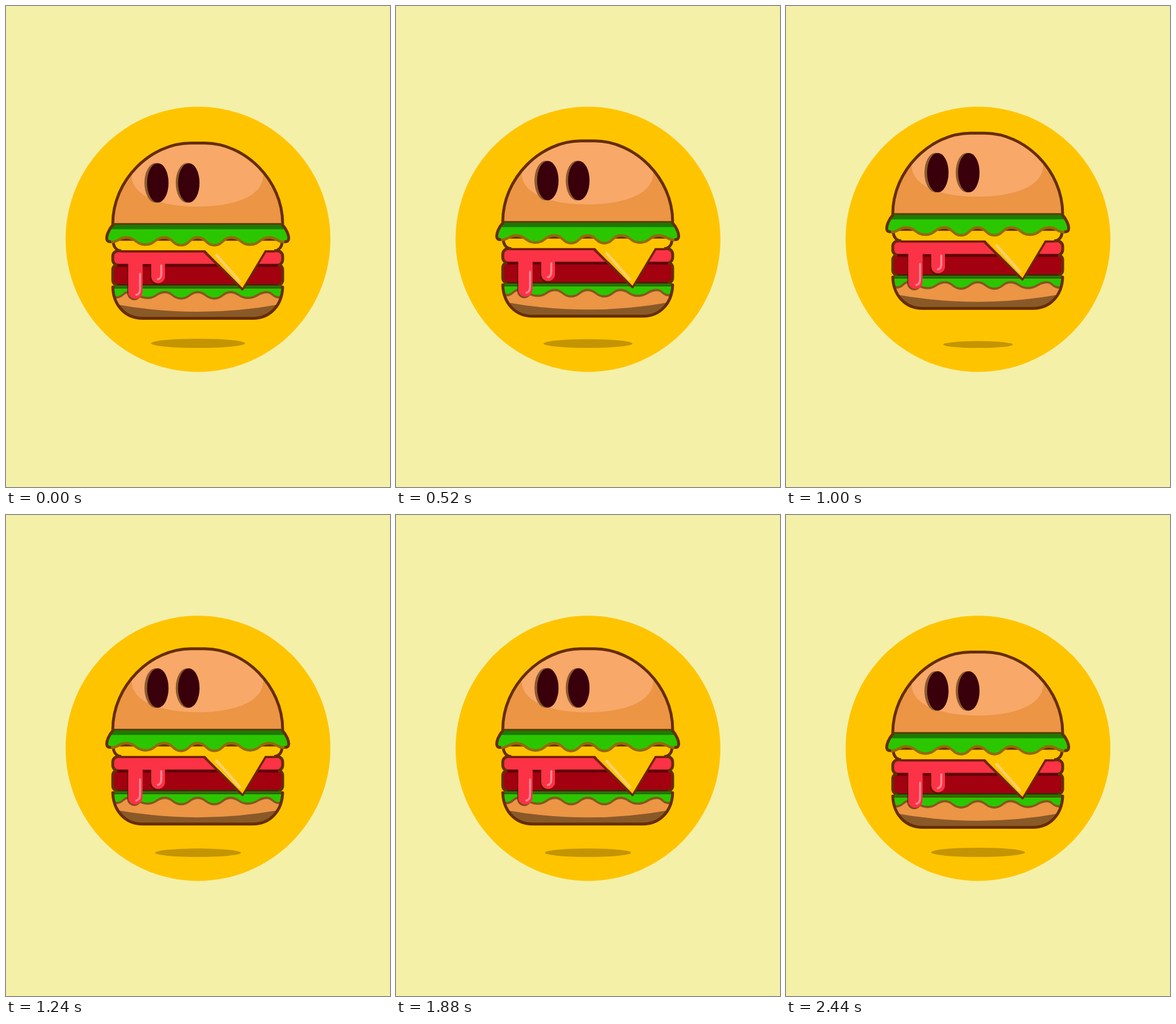
An HTML page for the animation above (2480 ms loop, 669 px wide and 837 px high).

```html
<!DOCTYPE html>
<html lang="en">
<head>
<meta charset="utf-8">
<title>Floating burger</title>
<style>
  html, body { margin: 0; width: 100%; height: 100%; overflow: hidden; background: #f4f0a8; }
  svg { display: block; width: 669px; height: 837px; }
  .rim { stroke: #662d00; stroke-width: 5; stroke-linejoin: round; stroke-linecap: round; }
  .line { fill: none; stroke-linecap: butt; }
  .shine { fill: none; stroke-linecap: round; }
</style>
</head>
<body>
<svg viewBox="0 0 669 837">
  <defs>
    <path id="dome" d="M186 379C186 303 252 238.5 322 238.5H346C416 238.5 482 303 482 379"/>
    <path id="heel" d="M186 489C187 521 208 543.5 238 543.5H430C460 543.5 481 521 482 489Z"/>
    <path id="drips" d="M213 436H277V470.5A12 12 0 0 1 253 470.5V449H238V497A12.5 12.5 0 0 1 213 497Z"/>
    <clipPath id="domeClip"><use href="#dome"/></clipPath>
    <clipPath id="heelClip"><use href="#heel"/></clipPath>
    <clipPath id="dripClip"><rect x="205" y="451" width="80" height="70"/></clipPath>
  </defs>

  <circle cx="334.5" cy="406" r="230.7" fill="#ffc400"/>
  <ellipse id="shadow" cx="334.5" fill="#c49500"/>

  <g id="burger">
    <!-- bottom bun and lower lettuce -->
    <use href="#heel" fill="#eb9545"/>
    <g clip-path="url(#heelClip)">
      <path d="M180 517Q334 547 488 517V550H180Z" fill="#8a5928"/>
      <path id="lowEdge" class="line" stroke="#85581c" stroke-width="5"/>
      <path id="lowLeaf" fill="#2ac700"/>
    </g>
    <use href="#heel" class="rim" fill="none"/>

    <!-- patty and tomato -->
    <rect class="rim" x="186" y="450" width="296" height="36" rx="9" fill="#a30010"/>
    <rect class="rim" x="186" y="426" width="296" height="25" rx="9.5" fill="#fc3246"/>
    <path d="M194 451.5H474" stroke="#62000c" stroke-width="4.5"/>
    <path d="M194 485.5H474" stroke="#501400" stroke-width="2.5"/>
    <path d="M189 488.3H479" stroke="#1d7a00" stroke-width="4"/>

    <!-- sauce drips -->
    <use href="#drips" x="-2" y="2.5" fill="#4a1600" fill-opacity=".62" clip-path="url(#dripClip)"/>
    <use href="#drips" fill="#fc3246"/>
    <g class="shine" stroke="#ff8592" stroke-width="3.5">
      <path d="M233.5 466V494Q233 501.5 227 502.5"/>
      <path d="M270.5 451.5V467Q270 474.5 264.5 475.5"/>
    </g>

    <!-- cheese -->
    <path class="rim" d="M187 406C186 420 193 426 202 426H466C475 426 482 420 481 406Z" fill="#ffc400"/>
    <path d="M201 423.5H467" stroke="#ffc400" stroke-width="3.5"/>
    <path d="M201 427H467" stroke="#761c08" stroke-width="3.5"/>
    <path d="M345 427L412 493L452 427" fill="none" stroke="#6e2500" stroke-width="4" stroke-linejoin="round"/>
    <path d="M343 421L412 490.5L453.500 421Z" fill="#ffc400"/>
    <path class="shine" d="M367 434L407 479" stroke="#fdd06a" stroke-width="5"/>

    <!-- upper lettuce -->
    <path id="topLeaf" fill="#2ac700"/>
    <path id="topEdge" class="line" stroke="#946a04" stroke-width="4.5"/>
    <path d="M187 379H481L487 388.5H181Z" fill="#1d7a00"/>
    <path class="line rim" d="M187 380C178.500 389 175 400 175.500 405Q176 411 183 410M481 380C489.500 389 493 400 492.500 405Q492 411 485 410"/>

    <!-- top bun -->
    <use href="#dome" fill="#eb9545"/>
    <path clip-path="url(#domeClip)" d="M219 295C219 331 270 349 333.500 349S448 331 448 295V230H219Z" fill="#f8a868"/>
    <use href="#dome" class="rim" fill="none"/>
    <path d="M186 379.300H482" stroke="#5b3a00" stroke-width="3"/>

    <g id="eyes">
      <g fill="#8a5a2e">
        <ellipse cx="260.700" rx="19.500" ry="34.500"/>
        <ellipse cx="315.200" rx="19.500" ry="34.500"/>
      </g>
      <g fill="#39000b">
        <ellipse cx="264.500" rx="18.700" ry="34.300"/>
        <ellipse cx="318.500" rx="18.700" ry="34.300"/>
      </g>
    </g>
  </g>
</svg>
<script>
const LOOP = 2480, STEP = 40, RISE = 31, EYE_X = 291.5;
const $ = id => document.getElementById(id);
const mix = (a, b, k) => a + (b - a) * k;
const ease = x => (1 - Math.cos(Math.PI * Math.min(1, Math.max(0, x)))) / 2;

// Smooth wave through points, level at each of them.
const wave = pts => pts.slice(1).map(([x, y], i) => {
  const [px, py] = pts[i], m = (px + x) / 2;
  return `C${m} ${py} ${m} ${y} ${x} ${y}`;
}).join('');
const mirror = half => half.concat(half.slice(0, -1).reverse().map(([x, y]) => [668 - x, y]));
const lower = (pts, d) => pts.map(([x, y]) => [x, y + d]);

const hem = mirror([[183, 410], [209, 402], [243, 414.5], [276, 402], [305, 415.5], [334, 402]]);
const low = mirror([[193, 505], [213, 496], [247, 506], [277, 496], [305, 507], [334, 496]]);

$('topLeaf').setAttribute('d', 'M187 380C178.5 389 175 400 175.5 405Q176 411 183 410' +
  wave(hem) + 'Q492 411 492.5 405C493 400 489.5 389 481 380Z');
// The wavy hem uses a softer tone than the outer rim.
$('topEdge').setAttribute('d', 'M183 410.8' + wave(lower(hem, .8)));
$('lowEdge').setAttribute('d', 'M184 500Q188 507 193 506.5' + wave(lower(low, 1.5)) + 'Q480 507 484 500');
$('lowLeaf').setAttribute('d', 'M184 486V498Q188 505 193 505' + wave(low) + 'Q480 505 484 498V486Z');

// Turning points of the float, alternately low and high.
const turns = [0, 310, 580, 875, 1144, 1480, 1790, 2110, 2450];

function lift(t) {
  const i = turns.findIndex(end => t < end) - 1;
  if (i < 0) return 0;
  const k = ease((t - turns[i]) / (turns[i + 1] - turns[i]));
  return i % 2 ? 1 - k : k;
}

function draw(t) {
  const up = lift(t);
  $('burger').setAttribute('transform', `translate(0 ${-RISE * up})`);

  const ry = mix(8.1, 4.3, up);
  $('shadow').setAttribute('rx', mix(82, 43.5, up));
  $('shadow').setAttribute('ry', ry);
  $('shadow').setAttribute('cy', 595.1 - ry);

  const blink = ease(1 - Math.abs(t - 770) / 130);
  const y = 307.8 - 1.6 * t / LOOP;
  $('eyes').setAttribute('transform',
    `translate(${EYE_X} ${y}) scale(${1 + .25 * blink} ${1 - .6 * blink}) translate(${-EYE_X} 0)`);
}

const start = performance.now();
function tick() {
  const t = (performance.now() - start) % LOOP;
  draw(Math.floor(t / STEP) * STEP);
  requestAnimationFrame(tick);
}
tick();
</script>
</body>
</html>
```
